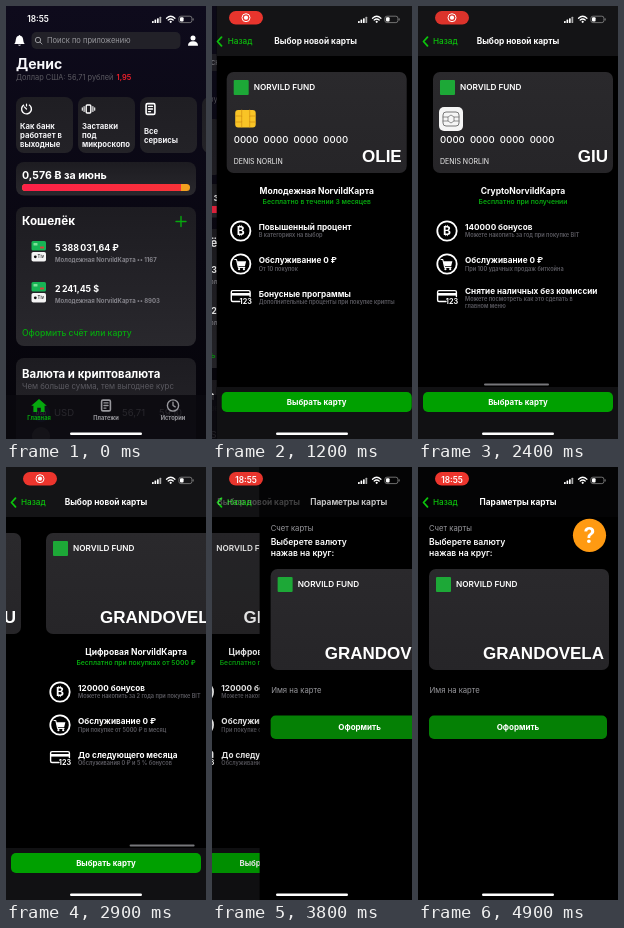
Write an HTML page that moves like this. It is 200 by 433 pixels and loops after 5 s.

```html
<!DOCTYPE html>
<html lang="ru">
<head>
<meta charset="utf-8">
<title>Карты</title>
<style>
html, body { margin: 0; width: 100%; height: 100%; overflow: hidden; background: #000; }
svg { display: block; width: 100%; height: 100%; font-family: Inter, Roboto, sans-serif; }
</style>
</head>
<body>
<svg id="stage" viewBox="0 0 200 433" xmlns="http://www.w3.org/2000/svg"></svg>
<script>
const GRAY = '#5b5a61', SOFT = '#98989d', GREEN = '#06a80e', LINK = '#0cc40c', PANEL = 'url(#panel)';
const FUND = 'NORVILD FUND', OWNER = 'DENIS NORLIN', CARD = 'NorvildКарта';

// y is the visual middle of the line
const text = (x, y, size, str, fill = '#fff', weight = 400, anchor = 'start', more = '') =>
  `<text x="${x}" y="${(y + size * 0.36).toFixed(2)}" font-size="${size}" fill="${fill}" font-weight="${weight}" text-anchor="${anchor}" ${more}>${str}</text>`;
const rect = (x, y, w, h, r, fill, more = '') =>
  `<rect x="${x}" y="${y}" width="${w}" height="${h}" rx="${r}" fill="${fill}" ${more}/>`;
const circle = (x, y, r, fill, more = '') => `<circle cx="${x}" cy="${y}" r="${r}" fill="${fill}" ${more}/>`;
const line = (d, stroke = '#fff', w = 1.2) =>
  `<path d="${d}" fill="none" stroke="${stroke}" stroke-width="${w}" stroke-linecap="round" stroke-linejoin="round"/>`;
const shape = (d, fill = '#fff') => `<path d="${d}" fill="${fill}"/>`;
const group = (id, body, more = '') => `<g id="${id}" ${more}>${body}</g>`;
const at = (x, y, body) => `<g transform="translate(${x} ${y})">${body}</g>`;

const docIcon = (c) => rect(-4.4, -5.4, 8.8, 10.8, 1.4, 'none', `stroke="${c}" stroke-width="1.6"`) +
  line('M-2 -2.6H2M-2 0H2M-2 2.6H0', c, 1.4);

function tile(x, icon, lines) {
  const top = lines.length === 3 ? 120.5 : 125;
  return rect(x, 91, 57, 56, 8, 'url(#tile)') + at(x + 10.5, 103, icon) +
    lines.map((s, i) => text(x + 4, top + i * 9, 7.7, s, '#f4f4f7', 700)).join('');
}

function account(y, sum, digits) {
  return rect(25.5, y - 7, 14.5, 9.5, 1.5, '#17b455') + rect(27.5, y - 5, 4, 2.5, 0.6, '#7ee09a') +
    rect(34, y - 1.5, 4, 2, 0.5, '#d8433d') +
    rect(25.5, y + 4, 14.5, 9.5, 1.8, '#f4f4f4') + circle(29.3, y + 8.8, 1.4, '#111') +
    text(31.6, y + 8.8, 4.4, 'Tiv', '#111', 500) +
    text(49, y, 8.8, sum, '#fff', 700) +
    text(49, y + 12, 6, `Молодежная ${CARD} •• ${digits}`, '#85848b', 700);
}

function tab(x, label, icon, color) {
  return at(x, 399.5, icon) + text(x, 412, 5.7, label, color, 700, 'middle');
}

function rate(id, label, x, delta, color) {
  return group(id, text(10, 71, 7.4, label, GRAY) + text(x, 71, 7.4, delta, color, 600));
}

function home() {
  const dial = circle(0, 0, 4.9, 'none', 'stroke="#fff" stroke-width="1.4" stroke-dasharray="25 5" transform="rotate(-60)"') +
    line('M0 0L-2.2 -2.2M0 -4.8V-3');
  const buzz = rect(-2.3, -4, 4.6, 8, 1, 'none', 'stroke="#fff" stroke-width="1.4"') +
    line('M-4.4 -2.4V2.4M4.4 -2.4V2.4M-6.2 -1.2V1.2M6.2 -1.2V1.2', '#fff', 1.1);
  const house = shape('M0 -6.6L7.8 0.2H5.6V6.6H1.8V2.2H-1.8V6.6H-5.6V0.2H-7.8Z', GREEN);
  const clock = circle(0, 0, 5.6, 'none', `stroke="${SOFT}" stroke-width="1.4"`) + line('M0 -3.4V0L2.2 1.4', SOFT, 1.3);
  const body =
    at(13.5, 34.5, shape('M-5.2 3.4C-3.4 1.8 -4.2 -0.6 -3.2 -2.8C-2.6 -4.2 -1.4 -4.6 -0.9 -4.8Q0 -6.4 0.9 -4.8C1.4 -4.6 2.6 -4.2 3.2 -2.8C4.2 -0.6 3.4 1.8 5.2 3.4Z') +
      shape('M-1.6 4.2H1.6Q0 6.4 -1.6 4.2Z')) +
    rect(25.5, 26, 149, 17, 5, '#222128') +
    circle(32, 34, 2.7, 'none', `stroke="${SOFT}" stroke-width="1"`) + line('M34 36L36 38', SOFT, 1) +
    text(41, 34.5, 7.5, 'Поиск по приложению', SOFT) +
    circle(187, 32, 2.5, '#fff') + shape('M182 39.8Q182 35.3 187 35.3Q192 35.3 192 39.8Z') +
    text(10, 58, 14, 'Денис', '#f8f8fb', 700) +
    rate('dollar', 'Доллар США: 56,71 рублей', 110.5, '1,95', '#f0202c') +
    rate('euro', 'Евро: 59,33 рублей', 82, '+2,46', '#1fce2c') +
    tile(10, dial, ['Как банк', 'работает в', 'выходные']) +
    tile(72, buzz, ['Заставки', 'под', 'микроскопо']) +
    tile(134, docIcon('#fff'), ['Все', 'сервисы']) +
    tile(196, circle(0, 0, 4, '#fff'), ['Гид', 'Для вас']) +
    rect(10, 156, 180, 33.5, 8, PANEL) +
    text(16, 169.5, 10.6, '0,576 Ƀ за июнь', '#fff', 700) +
    rect(16, 178, 168, 7, 3.5, '#f2a01f') + shape('M19.5 178H175V185H19.5A3.5 3.5 0 0 1 19.5 178Z', 'url(#bar)') +
    rect(10, 201, 180, 139, 8, PANEL) +
    text(16, 215, 11.7, 'Кошелёк', '#fff', 700) + line('M170 215.5H180M175 210.5V220.5', GREEN, 1.4) +
    account(242, '5\u2009388\u2009031,64 ₽', '1167') + account(283, '2\u2009241,45 $', '8903') +
    text(16, 327, 8.6, 'Оформить счёт или карту', GREEN, 500) +
    rect(10, 352, 180, 120, 8, PANEL) +
    text(16, 368, 11.4, 'Валюта и криптовалюта', '#fff', 700) +
    text(16, 380, 7.8, 'Чем больше сумма, тем выгоднее курс', GRAY) +
    circle(35, 407, 9, '#31406e') + text(35, 407, 5, 'USD', '#fff', 600, 'middle') +
    text(48, 407, 9.5, 'USD', '#ddd') + text(116, 407, 9.5, '56,71', '#ddd') + text(153, 407, 9.5, '59,10', '#ddd') +
    circle(35, 430, 9, '#555');
  const tabs = rect(0, 389, 200, 44, 0, '#0a090e', 'opacity=".86"') +
    tab(33, 'Главная', house, GREEN) + tab(100, 'Платежи', docIcon(SOFT), SOFT) + tab(167, 'Истории', clock, SOFT);
  return rect(-5, 0, 210, 433, 0, 'url(#night)') + group('homeBody', body) + tabs;
}

function plastic(y, brand, chip = '') {
  const x = 10;
  return rect(x, y, 180, 101, 7, 'url(#card)') + rect(x + 7, y + 8, 15, 15, 1, '#1da837') +
    text(x + 27, y + 15, 8.2, FUND, '#fff', 600) + chip +
    text(185, y + 84, 17, brand, '#fff', 700, 'end', 'font-family="Liberation Sans, Arial, sans-serif"');
}

const numbers = text(17, 134, 9.6, Array(4).fill('0000').join('\u00a0\u00a0'), '#fff', 500) +
  text(17, 155, 7, OWNER, '#f0f0f0');
const goldChip = rect(18.5, 104, 20.5, 17.5, 3, '#f9c426') +
  line('M19 110H25V116H19M39 110H33V116H39M25 104V110M33 104V110M25 116V121M33 116V121', '#d18f12', 0.7) + numbers;
const whiteChip = rect(16, 101, 24, 24, 5, '#f5f5f5') + rect(20, 106, 16, 14, 3, 'none', 'stroke="#777" stroke-width="1"') +
  line('M20 111H25V115H20M36 111H31V115H36M25 111L28 109L31 111M25 115L28 117L31 115', '#777', 0.8) + numbers;

const ring = circle(0, 0, 9.7, 'none', 'stroke="#fff" stroke-width="1.8"');
const icons = [
  ring + text(0, 0, 12, '₿', '#fff', 700, 'middle'),
  ring + shape('M-3.8 -2.8H5.4L4.2 2H-2.6Z') + line('M-6 -4.5H-4.2L-2.4 3.4H4', '#fff', 1.1) +
    circle(-1.6, 5.2, 1.1, '#fff') + circle(3.2, 5.2, 1.1, '#fff'),
  line('M-1 4.5H-8Q-9.4 4.5 -9.4 3V-5Q-9.4 -6.4 -8 -6.4H8Q9.4 -6.4 9.4 -5V-0.5', '#fff', 1.4) +
    rect(-9.4, -4, 18.8, 2.6, 0, '#fff') + text(5, 4, 7.2, '123', '#fff', 700, 'middle')
];

function page(i, card, title, sub, rows) {
  const body = rows.map(([head, ...notes], k) => {
    const y = [221, 254.5, 288][k] - 3 * (notes.length - 1);
    return at(24, [225, 258, 291][k], icons[k]) + text(42, y, 8.2, head, '#fff', 700) +
      notes.map((s, n) => text(42, y + 8.2 + n * 6.5, 5.6, s, GRAY, 600)).join('');
  }).join('');
  return at(205 * i, 0, card + text(100, 184.5, 8.5, title, '#fff', 700, 'middle') +
    text(100, 196, 6.8, sub, GREEN, 600, 'middle') + body);
}

function picker() {
  const pages =
    page(0, plastic(66, 'OLIE', goldChip), `Молодежная ${CARD}`, 'Бесплатно в течении 3 месяцев', [
      ['Повышенный процент', 'В категориях на выбор'],
      ['Обслуживание 0 ₽', 'От 10 покупок'],
      ['Бонусные программы', 'Дополнительные проценты при покупке крипты']]) +
    page(1, plastic(66, 'GIU', whiteChip), `Crypto${CARD}`, 'Бесплатно при получении', [
      ['140000 бонусов', 'Можете накопить за год при покупке BIT'],
      ['Обслуживание 0 ₽', 'При 100 удачных продаж биткойна'],
      ['Снятие наличных без комиссии', 'Можете посмотреть как это сделать в', 'главном меню']]) +
    page(2, plastic(66, 'GRANDOVELA'), `Цифровая ${CARD}`, 'Бесплатно при покупках от 5000 ₽', [
      ['120000 бонусов', 'Можете накопить за 2 года при покупке BIT'],
      ['Обслуживание 0 ₽', 'При покупке от 5000 ₽ в месяц'],
      ['До следующего месяца', 'Обслуживания 0 ₽ и 5 % бонусов']]);
  return rect(0, 0, 200, 433, 0, '#000') + rect(0, 0, 200, 50, 0, '#141416') + group('pages', pages) +
    rect(0, 381, 200, 52, 0, '#111113') + rect(0, 377.5, 65, 2, 1, '#77777b', 'id="thumb"') +
    rect(5, 386, 190, 20, 5, '#00a000') + text(100, 396, 7.9, 'Выбрать карту', '#fff', 700, 'middle');
}

function params() {
  return rect(0, 0, 200, 433, 0, '#000') + rect(0, 0, 200, 50, 0, '#040405') +
    text(11, 61.5, 7.7, 'Счет карты', SOFT) +
    text(11, 75, 8.6, 'Выберете валюту', '#fff', 600) + text(11, 86, 8.6, 'нажав на круг:', '#fff', 600) +
    circle(171.5, 68.3, 16.6, '#ff9a12') + text(171.5, 68.5, 21, '?', '#fff', 700, 'middle') +
    at(1, 0, plastic(102, 'GRANDOVELA')) +
    text(11.5, 223, 7.7, 'Имя на карте', SOFT) +
    rect(11, 248.5, 178, 23.5, 5, '#058005') + text(100, 260, 8, 'Оформить', '#fff', 700, 'middle');
}

function chrome() {
  const bars = [0, 1, 2, 3].map(i => rect(146 + i * 2.5, 15 - i * 1.4, 1.7, 2 + i * 1.4, 0.5, i < 3 ? '#fff' : '#aaa')).join('');
  const wifi = line('M160.5 12.2Q164.7 8.4 168.9 12.2M162.2 14.1Q164.7 11.8 167.2 14.1', '#fff', 1.3) + circle(164.7, 15.8, 1.1, '#fff');
  const battery = rect(172.9, 10.2, 13, 6.4, 2, 'none', 'stroke="#8a8a8a" stroke-width=".8"') +
    rect(174, 11.3, 3.6, 4.2, 1, '#fff') + rect(186.6, 12.2, 1, 2.4, 0.5, '#8a8a8a');
  const clock = (x) => text(x, 13, 8.3, '18:55', '#fff', 600, 'middle');
  const title = (s) => text(100, 35.5, 8.3, s, '#fff', 700, 'middle');
  return group('back', line('M9.5 31.2L5.5 35.5L9.5 39.8', LINK, 1.8) + group('backText', text(15, 35.5, 8.2, 'Назад', LINK, 500))) +
    group('pickTitle', title('Выбор новой карты')) + group('paramTitle', title('Параметры карты')) +
    bars + wifi + battery + group('plainTime', clock(32)) +
    rect(17, 5, 34, 13.5, 6.75, '#f0362e', 'id="pill"') +
    group('rec', circle(34, 11.7, 4, 'none', 'stroke="#fff" stroke-width="1"') + circle(34, 11.7, 2.1, '#fff')) +
    group('pillTime', clock(34)) +
    rect(64, 426.4, 72, 2.6, 1.3, '#fff');
}

const grad = (id, a, b, dir) => `<linearGradient id="${id}" ${dir}><stop stop-color="${a}"/><stop offset="1" stop-color="${b}"/></linearGradient>`;
const down = 'x1="0" y1="0" x2="0" y2="1"';
document.getElementById('stage').innerHTML =
  `<defs>${grad('night', '#0e0b1c', '#050409', down)}${grad('panel', '#1d1c21', '#29282d', down)}${grad('tile', '#1f1e23', '#232227', down)}` +
  `${grad('card', '#2a292c', '#262528', down)}${grad('bar', '#fd2148', '#f83238', '')}</defs>` +
  group('home', home()) + rect(0, 0, 200, 433, 0, '#000', 'id="homeDim"') +
  group('picker', picker()) + rect(0, 0, 200, 433, 0, '#000', 'id="pickDim"') +
  group('params', params()) + chrome();

const ui = {};
document.querySelectorAll('[id]').forEach(e => ui[e.id] = e);
const move = (e, x, y = 0) => e.setAttribute('transform', `translate(${x.toFixed(2)} ${y})`);
const fade = (e, a) => {
  e.setAttribute('opacity', a.toFixed(3));
  e.setAttribute('visibility', a > 0 ? 'visible' : 'hidden');
};

const LOOP = 5000, STEP = 100, PUSH = [836, 3622], SPRING = 0.0155;
const SWIPE = [[1200, 0], [1300, 0.02], [1400, 0.08], [1500, 0.22], [1600, 0.415], [1700, 0.74], [1800, 0.92], [1900, 0.98], [2000, 1],
  [2400, 1], [2500, 1.04], [2600, 1.15], [2700, 1.38], [2800, 1.7], [2900, 1.9], [3000, 1.98], [3100, 2]];

function track(steps, t) {
  if (t <= steps[0][0]) return steps[0][1];
  for (let i = 1; i < steps.length; i++) {
    const [t0, a] = steps[i - 1], [t1, b] = steps[i];
    if (t <= t1) return a + (b - a) * (t - t0) / (t1 - t0);
  }
  return steps[steps.length - 1][1];
}

function push(t, start) {
  const k = Math.max(0, t - start) * SPRING;
  const p = 1 - (1 + k) * Math.exp(-k);
  return p > 0.998 ? 1 : p;
}

function draw(now) {
  const t = Math.floor(now % LOOP / STEP) * STEP;
  const a = push(t, PUSH[0]), b = push(t, PUSH[1]), swipe = track(SWIPE, t);

  move(ui.home, -58 * a);
  move(ui.homeBody, 0, a > 0 ? 22 : 0);
  fade(ui.homeDim, a * 0.15);
  move(ui.picker, 200 * (1 - a) - 56 * b);
  fade(ui.pickDim, b * 0.15);
  move(ui.params, 200 * (1 - b));
  move(ui.pages, -200 * swipe);
  move(ui.thumb, 2 + 64 * swipe);
  fade(ui.thumb, t >= 1300 ? 1 : 0);

  fade(ui.back, a);
  move(ui.backText, 30 * (1 - a));
  fade(ui.pickTitle, a * (1 - b));
  move(ui.pickTitle, 154 * (1 - a) - 70 * b);
  fade(ui.paramTitle, b);
  move(ui.paramTitle, 154 * (1 - b));

  const euro = t >= 400, live = t >= 300, timed = t >= 3000;
  fade(ui.dollar, euro ? 0 : 1);
  fade(ui.euro, euro ? 1 : 0);
  fade(ui.plainTime, live ? 0 : 1);
  fade(ui.pill, live ? 0.95 + 0.05 * Math.cos(t / 1000 * Math.PI * 2) : 0);
  fade(ui.rec, live && !timed ? 1 : 0);
  fade(ui.pillTime, timed ? 1 : 0);
}

function tick() {
  draw(performance.now());
  requestAnimationFrame(tick);
}
tick();
</script>
</body>
</html>
```
